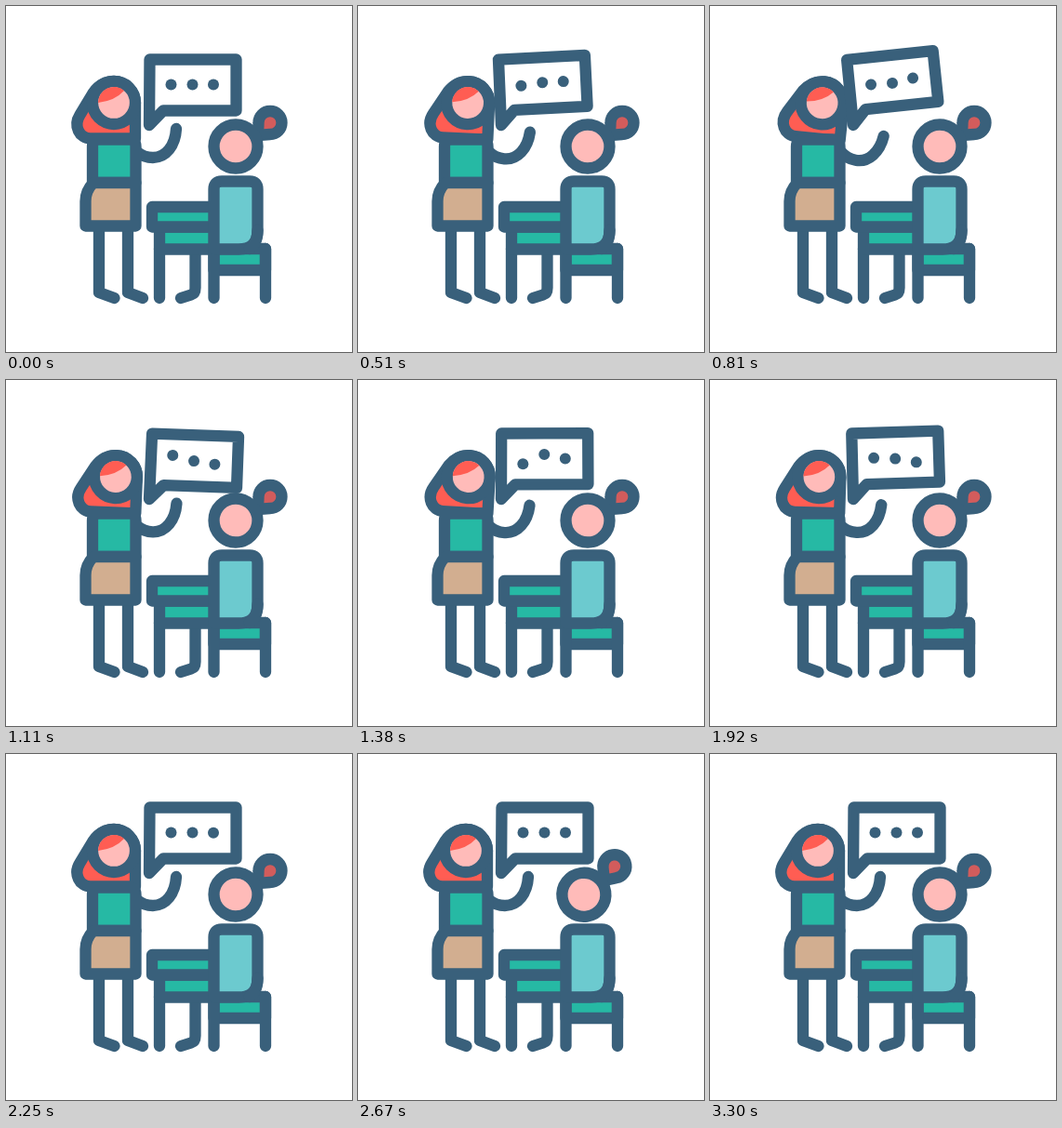
These frames come from a looping animation (372x372 px, 3600 ms). An HTML page:

```html
<!DOCTYPE html>
<html lang="en">
<head>
<meta charset="utf-8">
<title>Conversation</title>
<style>
  html, body { margin: 0; width: 100%; height: 100%; overflow: hidden; background: #fff; }
  svg { display: block; width: 100vw; height: 100vh; }
  .line { stroke: #39607b; stroke-width: 12.3; stroke-linecap: round; stroke-linejoin: round; fill: none; }
  .line .teal { fill: #26b9a4; }
  .line .aqua { fill: #6ccacf; }
  .line .tan { fill: #d2ae90; }
  .line .skin { fill: #ffbbb9; }
  .line .red { fill: #ff5d53; }
  .line .bun { fill: #d25c5c; }
  .line .white { fill: #fff; }
  .line .flat { stroke: none; }
  .dots { fill: #39607b; }
</style>
</head>
<body>
<svg viewBox="0 0 372 372">
  <g class="line">
    <!-- desk -->
    <path d="M165 261V314M203.5 261V303Q203.5 309 199 310.5L188 314"/>
    <path class="teal" d="M165 237.5H224V261.5H165Z"/>
    <path class="teal" d="M157 216H224V237.5H157Z"/>

    <!-- seated listener -->
    <path class="teal" d="M223.5 261H279V284H223.5Z"/>
    <path d="M223.5 261V314M279 261V314"/>
    <path class="aqua" d="M223.5 261.5V197Q223.5 188.5 232 188.5H262Q270.5 188.5 270.5 197V241Q270.5 261.5 250 261.5Z"/>
    <path d="M270.5 241Q270.5 255 262 261"/>
    <g id="listener">
      <path class="bun" d="M271 139L271.5 125.500A12.500 12.500 0 1 1 284 138Z"/>
      <circle class="skin" cx="247" cy="151" r="23.500"/>
    </g>

    <!-- standing speaker -->
    <path id="arm" d="M141 157C147 162 152 163 158 163C172 163 182 150 183 132"/>
    <path d="M100 240V308L116.500 314M131 240V308L147 314"/>
    <g id="speaker">
      <path class="red" d="M139 142.500V104A23 23 0 0 0 116 81C105 81 99 86 94 93L79.500 117C72 129 79 142.500 91 142.500Z"/>
      <circle class="skin" cx="116" cy="104" r="23"/>
      <path class="red flat" d="M99 104A17 17 0 0 1 127 91Q117 102 99 104Z"/>
    </g>
    <path class="teal" d="M93 190V151Q93 143.500 100.500 143.500H132Q139.500 143.500 139.500 151V190Z"/>
    <path class="tan" d="M94 190C88 196 85.500 203 85.500 210V236.500H139.500V190Z"/>

    <g id="bubble">
      <path class="white" d="M154.500 57.500H247.500V112.500H169L154 128Z"/>
      <g class="dots flat">
        <circle cx="177.500" cy="84.500" r="6"/>
        <circle cx="200.500" cy="84.500" r="6"/>
        <circle cx="223" cy="84.500" r="6"/>
      </g>
    </g>
  </g>
</svg>
<script>
  const LOOP = 3600, STEP = 30, DOT_LAG = 255;
  const TALK = [300, 750, 1200, 1650, 2070];
  const BOUNCE = [300, 680, 1100, 1400, 1800];
  const NOD = [2400, 2850, 3300];
  const dots = document.querySelectorAll('.dots circle');

  // Cosine easing between successive key values.
  function ease(t, times, values) {
    if (t <= times[0]) return values[0];
    const i = times.findIndex(k => k > t);
    if (i < 0) return values[values.length - 1];
    const p = (t - times[i - 1]) / (times[i] - times[i - 1]);
    return values[i - 1] + (values[i] - values[i - 1]) * (1 - Math.cos(Math.PI * p)) / 2;
  }

  function turn(id, angle, x, y) {
    document.getElementById(id).setAttribute('transform', `rotate(${angle} ${x} ${y})`);
  }

  function draw(t) {
    turn('bubble', ease(t, TALK, [0, -6.4, 3, -6.4, 0]), 154, 128);
    turn('speaker', ease(t, TALK, [0, 6, 2, 6, 0]), 115, 150);
    turn('arm', ease(t, TALK, [0, 11, 0, 11, 0]), 142, 156);
    turn('listener', ease(t, NOD, [0, -12.5, 0]), 247, 180);
    dots.forEach((dot, i) => {
      const dy = ease(t - i * DOT_LAG, BOUNCE, [0, 4, -4.5, 6, 0]);
      dot.setAttribute('cy', 84.5 + dy);
    });
  }

  const start = performance.now();
  function frame() {
    const t = (performance.now() - start) % LOOP;
    draw(Math.floor(t / STEP) * STEP);
    requestAnimationFrame(frame);
  }
  frame();
</script>
</body>
</html>
```
